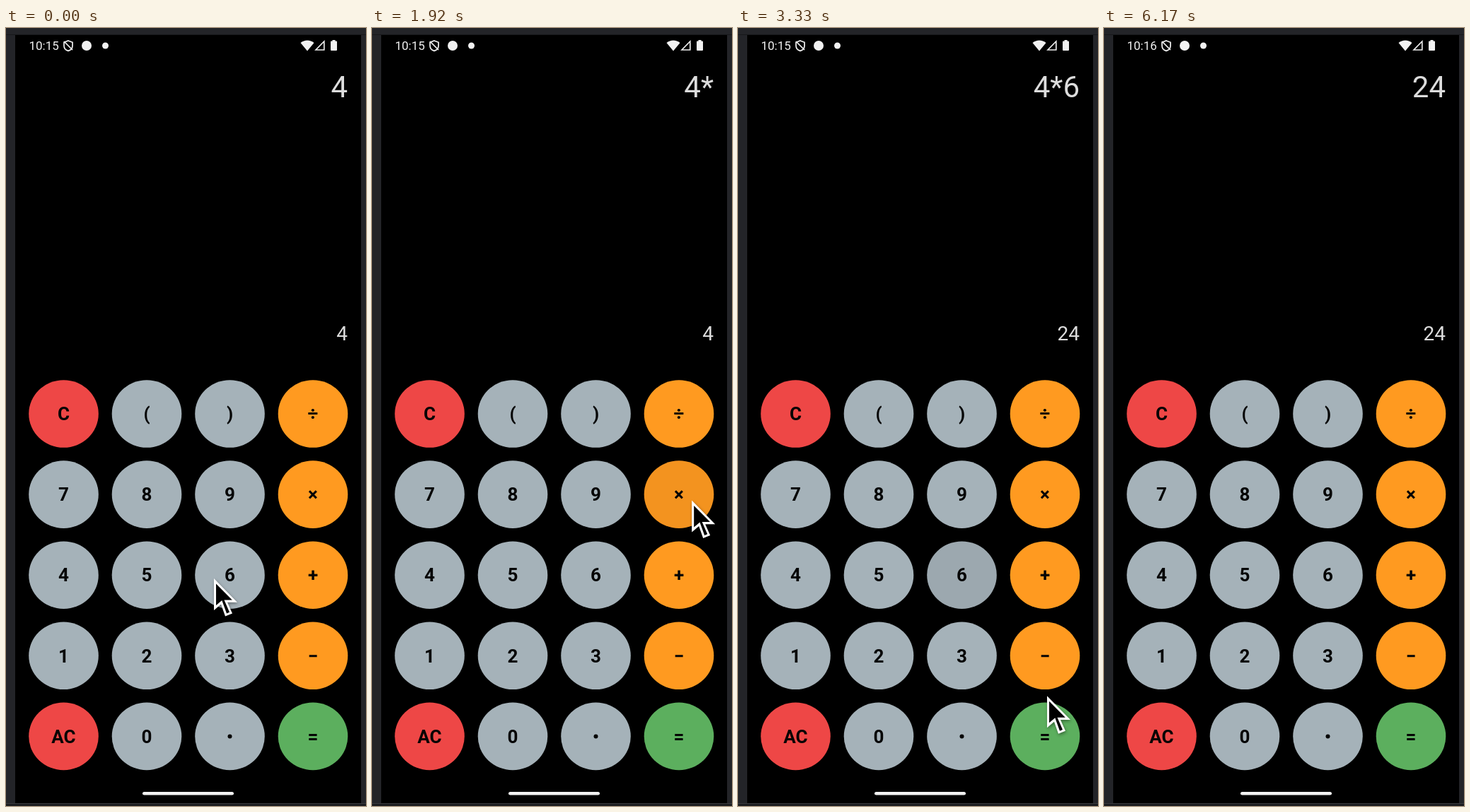
Write an HTML page that moves like this. It is 509 by 1101 pixels and loops after 6.25 s.

```html
<!DOCTYPE html>
<html lang="en">
<head>
<meta charset="utf-8">
<title>Calculator</title>
<style>
  html, body { margin: 0; width: 100%; height: 100%; overflow: hidden; background: #232428; }
  svg { display: block; width: 100vw; height: 100vh; }
  text { font-family: Roboto, "Liberation Sans", sans-serif; }
  .key { font-size: 26px; font-weight: 700; text-anchor: middle; fill: #050505; }
  .out { text-anchor: end; fill: #dcdcdc; }
</style>
</head>
<body>
<svg viewBox="0 0 509 1101" preserveAspectRatio="none">
  <rect width="509" height="1101" fill="#232428"/>
  <rect y="9" width="509" height="1" fill="#17181a"/>
  <rect x="13" y="10" width="489" height="1087" fill="#000"/>
  <rect y="1097" width="509" height="1" fill="#3a3b3e"/>
  <rect y="1098" width="509" height="3" fill="#1b1c1f"/>

  <g fill="#f2f2f2">
    <text id="clock" x="32.5" y="31" font-size="17">10:15</text>
    <g fill="none" stroke="#f2f2f2" stroke-width="1.7">
      <path d="M88 18 L94 20.3 V25 C94 28.5 91.5 31.4 88 32.4 C84.5 31.4 82 28.5 82 25 V20.3 Z"/>
      <path d="M82 19 L94 31"/>
    </g>
    <circle cx="114" cy="25" r="7"/>
    <circle cx="140.500" cy="25" r="4.500"/>
    <path d="M416.500 21 C421.500 16.300 430.500 16.300 435.500 21 L426 32.500 Z"/>
    <path d="M449.800 19 V31 H438 Z" fill="none" stroke="#f2f2f2" stroke-width="1.600"/>
    <path d="M461.500 18.500 V17 H465.500 V18.500 H467 Q468 18.500 468 19.500 V31 Q468 32 467 32 H460 Q459 32 459 31 V19.500 Q459 18.500 460 18.500 Z"/>
    <rect x="193" y="1081" width="129" height="4.600" rx="2.300"/>
  </g>

  <text id="entry" class="out" x="483" y="98" font-size="42">4</text>
  <text id="result" class="out" x="483" y="441.500" font-size="28">4</text>
  <g id="pad"></g>

  <g id="cursor" style="filter: drop-shadow(1px 2px 2px rgba(0,0,0,.4))">
    <path d="M0 0 V45 L10 36.500 L16 53.500 L26 49.500 L19 33.800 H33 Z" fill="#fff"/>
    <path d="M3 7.500 V38 L11.300 31 L18 49.500 L22 47.800 L14.500 30.600 H25.800 Z" fill="#000"/>
  </g>
</svg>
<script>
const LOOP = 6250, STEP = 1000 / 12;
const $ = id => document.getElementById(id);

function add(parent, tag, attrs, text) {
  const el = document.createElementNS("http://www.w3.org/2000/svg", tag);
  for (const k in attrs) el.setAttribute(k, attrs[k]);
  if (text) el.textContent = text;
  parent.appendChild(el);
  return el;
}

const GREY = "#a5b2b9", RED = "#ee4746", ORANGE = "#ff9a20", GREEN = "#5caf5e";
const rows = [
  ["C", "(", ")", "÷"],
  ["7", "8", "9", "×"],
  ["4", "5", "6", "+"],
  ["1", "2", "3", "−"],
  ["AC", "0", ".", "="]
];
const shades = {};

function colour(label, col) {
  if (label === "=") return GREEN;
  if (col === 3) return ORANGE;
  return label[label.length - 1] === "C" ? RED : GREY;
}

rows.forEach((row, r) => row.forEach((label, c) => {
  const cx = 81.5 + 117.5 * c, cy = 546 + 114.1 * r;
  const box = { x: cx - 49.3, y: cy - 47.8, width: 98.6, height: 95.6, rx: 49.3, ry: 47.8 };
  add($("pad"), "rect", { ...box, fill: colour(label, c) });
  shades[label] = add($("pad"), "rect", { ...box, fill: "#000", opacity: 0 });
  if (label === ".") add($("pad"), "circle", { cx, cy, r: 3, fill: "#050505" });
  else add($("pad"), "text", { x: cx, y: cy + 9.2, class: "key" }, label);
}));

const ease = {
  in: p => p * p,
  out: p => 1 - (1 - p) * (1 - p),
  line: p => p
};

// time, x, y, easing towards the next point
const path = [
  [0, 294, 779, "line"],
  [333, 444, 682, "out"],
  [667, 452, 670, "out"],
  [1000, 457, 664, "line"],
  [1833, 457, 664, "in"],
  [2083, 414, 704, "line"],
  [2333, 351, 758, "out"],
  [2583, 314, 782, "line"],
  [2833, 314, 782, "in"],
  [3083, 368, 858, "line"],
  [3333, 437, 945, "out"],
  [3583, 430, 1012, "line"],
  [3917, 430, 1012, "line"]
];
const HIDE = 3910;

const taps = [["×", 1833], ["6", 2750], ["=", 3583]];
const entries = [[0, "4"], [1910, "4*"], [2830, "4*6"], [4080, "24"]];
const results = [[0, "4"], [2830, "24"]];
const clocks = [[0, "10:15"], [3745, "10:16"]];

const pick = (list, t) => list.filter(item => item[0] <= t).pop()[1];

function place(t) {
  let i = 0;
  while (i < path.length - 2 && path[i + 1][0] <= t) i++;
  const [t0, x0, y0, mode] = path[i], [t1, x1, y1] = path[i + 1];
  const p = ease[mode](Math.min(1, (t - t0) / (t1 - t0)));
  return [x0 + (x1 - x0) * p, y0 + (y1 - y0) * p];
}

function press(age) {
  if (age < 0 || age > 700) return 0;
  if (age < 160) return 0.09 * age / 160;
  return 0.09 * Math.min(1, (700 - age) / 190);
}

function draw(now) {
  const t = Math.floor((now % LOOP + 4) / STEP) % 75 * STEP;
  $("clock").textContent = pick(clocks, t);
  $("entry").textContent = pick(entries, t);
  $("result").textContent = pick(results, t);
  for (const [label, at] of taps) shades[label].setAttribute("opacity", press(t - at));
  $("cursor").setAttribute("transform", `translate(${place(t)})`);
  $("cursor").setAttribute("visibility", t < HIDE ? "visible" : "hidden");
}

const start = performance.now();
function tick() {
  draw(performance.now() - start);
  requestAnimationFrame(tick);
}
tick();
</script>
</body>
</html>
```
